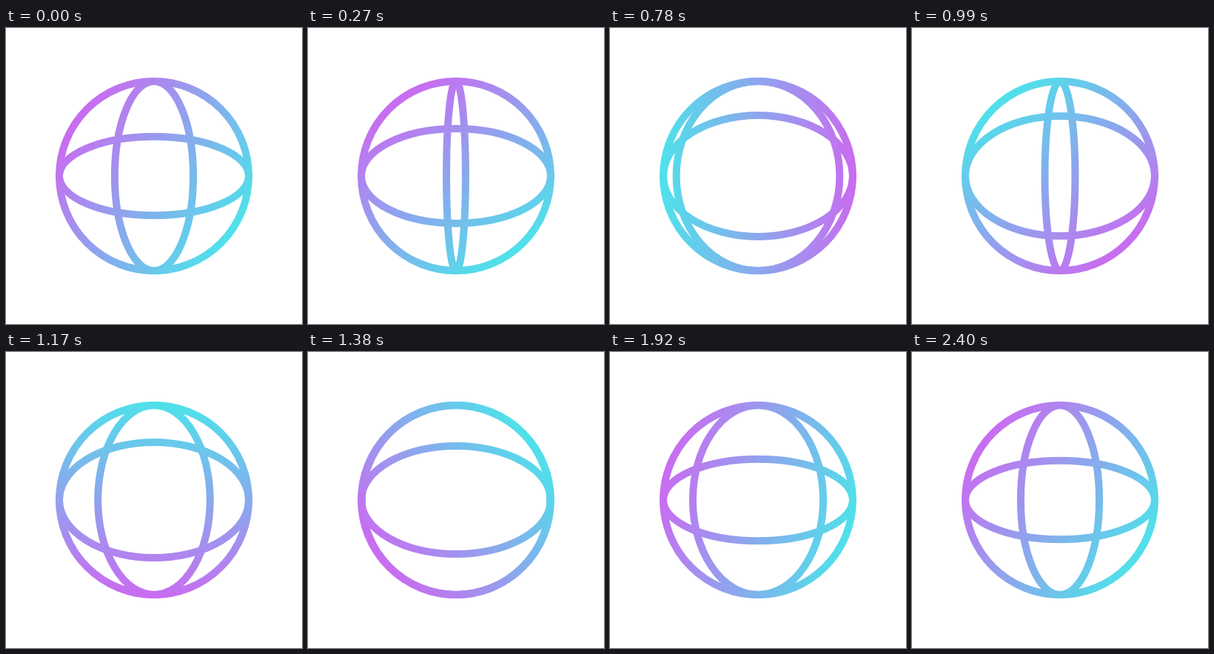
An HTML page with a canvas that plays this animation: 400 px wide and 400 px high, repeating every 4.46 s.

```html
<!DOCTYPE html>
<html lang="en">
<head>
<meta charset="utf-8">
<title>Spinning globe</title>
<style>
html, body { margin: 0; width: 100%; height: 100%; overflow: hidden; background: #fff; }
canvas { display: block; width: 100vw; height: 100vh; }
</style>
</head>
<body>
<canvas id="stage"></canvas>
<script>
const SIZE = 400, C = 200, R = 128;
const LOOP = 4460, SPIN_END = 2400, STEP = 30;
const MERIDIAN = 24.5, LIGHT = -56;

const canvas = document.getElementById('stage');
const ctx = canvas.getContext('2d');
const rad = deg => deg * Math.PI / 180;

// Smooth cubic through [time, value] points, with given end slopes
function curve(points, startSlope, endSlope) {
  const last = points.length - 1;
  const rate = i => (points[i + 1][1] - points[i][1]) / (points[i + 1][0] - points[i][0]);
  const slopes = points.map((p, i) => {
    if (i === 0) return startSlope;
    if (i === last) return endSlope;
    const before = p[0] - points[i - 1][0];
    const after = points[i + 1][0] - p[0];
    return (rate(i - 1) * after + rate(i) * before) / (before + after);
  });
  return t => {
    let i = 0;
    while (i < last - 1 && t > points[i + 1][0]) i++;
    const [t0, a] = points[i], [t1, b] = points[i + 1];
    const h = t1 - t0, u = (t - t0) / h, v = 1 - u;
    return a * v * v * (1 + 2 * u) + b * u * u * (3 - 2 * u)
      + h * u * v * (slopes[i] * v - slopes[i + 1] * u);
  };
}

const spin = curve([
  [0, 0], [270, 18.7], [510, 79], [990, 195.3], [1380, 288], [1920, 341], [SPIN_END, 360]
], 0.01, 0.01);

const equator = curve([
  [0, 53.3], [270, 64], [510, 77], [830, 82], [990, 81], [1380, 73], [1920, 55.3], [SPIN_END, 53.3]
], 0.03, 0);

function ring(rx, ry) {
  ctx.beginPath();
  ctx.ellipse(C, C, rx, ry, 0, 0, Math.PI * 2);
  ctx.stroke();
}

function paint(t) {
  const turn = spin(Math.min(t, SPIN_END));
  const angle = rad(LIGHT + turn);
  const dx = R * Math.sin(angle), dy = -R * Math.cos(angle);
  const ink = ctx.createLinearGradient(C + dx, C + dy, C - dx, C - dy);
  ink.addColorStop(0, '#c86df0');
  ink.addColorStop(1, '#50e0ea');

  ctx.setTransform(canvas.width / SIZE, 0, 0, canvas.height / SIZE, 0, 0);
  ctx.fillStyle = '#fff';
  ctx.fillRect(0, 0, SIZE, SIZE);
  ctx.strokeStyle = ink;
  ctx.lineWidth = 10;
  ring(R, R);
  ring(R, equator(Math.min(t, SPIN_END)));
  ring(R * Math.abs(Math.sin(rad(MERIDIAN - turn))), R);
}

function resize() {
  const scale = window.devicePixelRatio || 1;
  canvas.width = Math.round(innerWidth * scale);
  canvas.height = Math.round(innerHeight * scale);
}

function tick() {
  const t = (performance.now() - start) % LOOP;
  paint(Math.floor(t / STEP) * STEP);
  requestAnimationFrame(tick);
}

addEventListener('resize', resize);
resize();
const start = performance.now();
tick();
</script>
</body>
</html>
```
